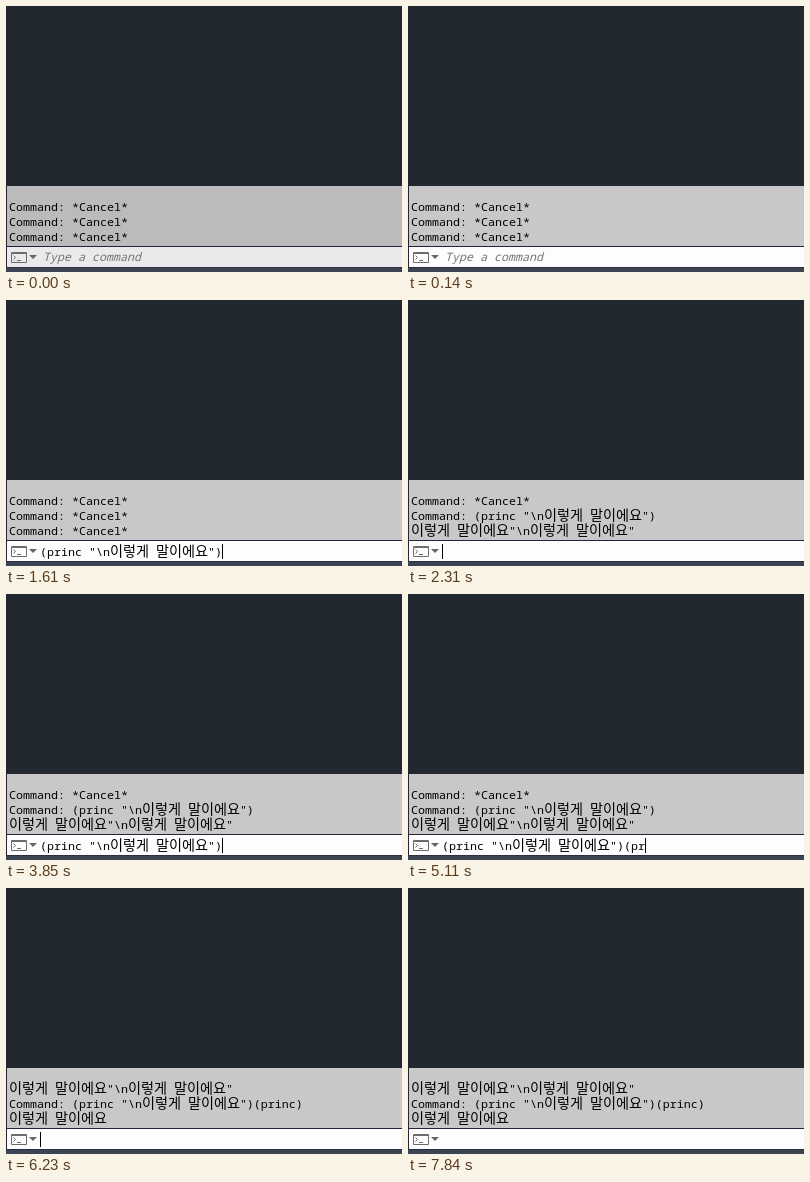
Recreate the animation shown at these times as an HTML page. Size 396 by 266 pixels, loop 8120 ms.

```html
<!DOCTYPE html>
<html lang="ko">
<head>
<meta charset="utf-8">
<style>
  html, body { margin: 0; height: 100%; overflow: hidden; background: #212830; }
  svg { display: block; }
  text { font: 11.667px "Noto Sans Mono", monospace; white-space: pre; }
  .hangul { font: 14.13px "Noto Sans CJK KR", "Noto Sans CJK", sans-serif; }
  #hint { font-style: italic; fill: #757575; }
</style>
</head>
<body>
<svg width="396" height="266">
  <rect width="396" height="266" fill="#212830"/>
  <rect id="history" x="1" y="180" width="395" height="60"/>
  <rect y="240" width="396" height="1" fill="#24243c"/>
  <rect id="field" x="1" y="241" width="395" height="20"/>
  <rect y="261" width="396" height="5" fill="#3b4453"/>
  <rect y="261" width="396" height="1" fill="#2b3040"/>
  <g fill="none" stroke="#6c6c6c">
    <path d="M5.5 246.5h15v10h-15zM5 247.5h16"/>
    <path d="M7.5 249.5l2 2l-2 2M11 254.5h4"/>
  </g>
  <path d="M23 249h8l-4 4z" fill="#666"/>
  <text class="line" x="3" y="205"/>
  <text class="line" x="3" y="220"/>
  <text class="line" x="3" y="235"/>
  <text id="hint" x="37" y="255">Type a command</text>
  <text id="input" x="34" y="256"/>
  <rect id="caret" y="244" width="1" height="15"/>
</svg>
<script>
const LOOP = 8120;
const byId = id => document.getElementById(id);
const lines = document.querySelectorAll('.line');

const words = '이렇게 말이에요';
const call = `(princ "\\n${words}")`;
const extra = '(princ)';
const echo = `${words}"\\n${words}"`;
const cancel = 'Command: *Cancel*';

const histories = [
  [0, [cancel, cancel, cancel]],
  [2240, [cancel, `Command: ${call}`, echo]],
  [6230, [echo, `Command: ${call}${extra}`, words]],
];
const keyTimes = [4410, 4900, 5110, 5250, 5390, 5530, 5740];
const inputs = [
  [0, ''], [1610, call], [2240, ''], [3850, call],
  ...keyTimes.map((time, i) => [time, call + extra.slice(0, i + 1)]),
  [6230, ''],
];
const carets = [
  [0, 0], [910, 1], [1470, 0], [1610, 1], [2240, 0], [2310, 1], [2940, 0],
  [3500, 1], [6860, 0], [7350, 1], [7840, 0],
];

const at = (steps, t) => steps.findLast(([time]) => time <= t)[1];
const textWidth = s => [...s].reduce((w, c) => w + (/[가-힣]/.test(c) ? 13 : 7), 0);

function setText(node, s) {
  if (node.shown === s) return;
  node.shown = s;
  node.innerHTML = s.replace(/[가-힣]+/g, '<tspan class="hangul">$&</tspan>');
}

function draw() {
  const t = performance.now() % LOOP;
  const dim = t < 140;
  byId('history').setAttribute('fill', dim ? '#bbb' : '#c8c8c8');
  byId('field').setAttribute('fill', dim ? '#ebe9ec' : '#fefcfe');
  at(histories, t).forEach((s, i) => setText(lines[i], s));

  const typed = at(inputs, t);
  setText(byId('input'), typed);
  byId('hint').setAttribute('visibility', t < 910 ? 'visible' : 'hidden');
  byId('caret').setAttribute('x', 34 + textWidth(typed));
  byId('caret').setAttribute('visibility', at(carets, t) ? 'visible' : 'hidden');
  requestAnimationFrame(draw);
}
draw();
</script>
</body>
</html>
```
